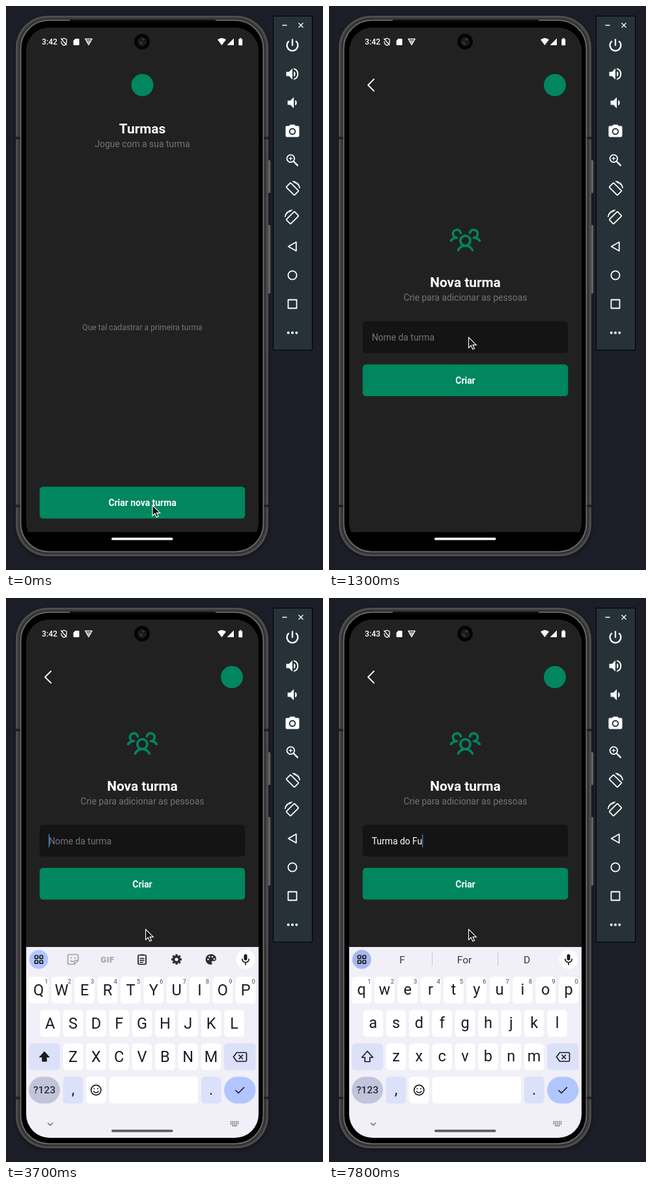
Recreate the animation shown at these times as an HTML page. Size 487x863 px, loop 8000 ms.

```html
<!DOCTYPE html>
<html lang="pt-BR">
<head>
<meta charset="utf-8">
<style>
html, body { margin: 0; width: 100%; height: 100%; overflow: hidden; background: #1b1e26; }
svg { display: block; width: 487px; height: 863px; font-family: Roboto, sans-serif; }
.mid { text-anchor: middle; }
.title { font-size: 20.8px; font-weight: 700; fill: #fff; }
.sub { font-size: 13.9px; fill: #73737f; }
.small { font-size: 12.15px; fill: #73737f; }
.btn { font-size: 13.9px; font-weight: 700; fill: #fff; }
.key { font-size: 23.5px; fill: #1b1c22; }
.hint { font-size: 9.5px; fill: #45464f; }
.word { font-size: 15.5px; fill: #34353c; }
.line { fill: none; stroke-linecap: round; stroke-linejoin: round; }
</style>
</head>
<body>
<svg viewBox="0 0 487 863">
  <defs>
    <clipPath id="screen"><rect x="31" y="33" width="357" height="793" rx="36"/></clipPath>
    <linearGradient id="side"><stop offset="0" stop-color="#333"/><stop offset=".5" stop-color="#858585"/><stop offset="1" stop-color="#444"/></linearGradient>
    <filter id="shadow"><feDropShadow dx="0" dy="2" stdDeviation="3" flood-opacity=".4"/></filter>
  </defs>

  <g id="phone">
    <rect x="402" y="236" width="4.5" height="50" rx="1.5" fill="url(#side)"/>
    <rect x="402" y="335" width="4.5" height="105" rx="1.5" fill="url(#side)"/>
    <rect x="15" y="15" width="388" height="827" rx="49" fill="#454545" filter="url(#shadow)"/>
    <rect x="16" y="16" width="386" height="825" rx="48" fill="none" stroke="#595959"/>
    <rect x="20" y="19.5" width="378" height="818" rx="45" fill="none" stroke="#303030" stroke-width="2"/>
    <rect x="22.7" y="22" width="372.6" height="813" rx="43" fill="#000" stroke="#6c6c6c" stroke-width="1.6"/>
    <path d="M98 22.5H322" stroke="#0b0b0b" stroke-width="3"/>
    <path d="M15 202h7M396 202h7M15 765h7M396 765h7" stroke="#222" stroke-width="4"/>
  </g>

  <g clip-path="url(#screen)">
    <rect x="31" y="33" width="357" height="772" fill="#212121"/>
    <g id="home">
      <rect x="31" y="33" width="357" height="772" fill="#212121"/>
      <circle cx="209.5" cy="121" r="17" fill="#00875f"/>
      <text class="mid title" x="209.5" y="195">Turmas</text>
      <text class="mid sub" x="209.5" y="215.5">Jogue com a sua turma</text>
      <text class="mid small" x="209.5" y="496">Que tal cadastrar a primeira turma</text>
      <g id="homeButton">
        <rect x="51.7" y="735.6" width="315.5" height="48.6" rx="5.2" fill="#00875f"/>
        <text class="mid btn" x="209.5" y="765">Criar nova turma</text>
      </g>
    </g>
    <g id="create">
      <rect x="31" y="33" width="357" height="772" fill="#212121"/>
      <circle cx="347" cy="121" r="17" fill="#00875f"/>
      <path class="line" d="M69 112l-9 9 9 9" stroke="#fff" stroke-width="1.8"/>
      <g id="form">
        <g class="line" transform="translate(185.1 332.5) scale(.19)" stroke="#00875f" stroke-width="19">
          <circle cx="128" cy="140" r="40"/>
          <path d="M196 116a59.8 59.8 0 0 1 48 24M12 140a59.8 59.8 0 0 1 48-24M70.4 216a64.1 64.1 0 0 1 115.2 0M60 116a32 32 0 1 1 31.4-38M164.6 78a32 32 0 1 1 31.4 38"/>
        </g>
        <text class="mid title" x="209.5" y="430">Nova turma</text>
        <text class="mid sub" x="209.5" y="451">Crie para adicionar as pessoas</text>
        <rect x="51.7" y="482.5" width="315.5" height="48.6" rx="5.2" fill="#141414"/>
        <text id="field" class="sub" x="65.7" y="512"></text>
        <rect id="caret" y="497" width="1.6" height="20" fill="#2f78ae"/>
        <rect x="51.7" y="548.5" width="315.5" height="48.6" rx="5.2" fill="#00875f"/>
        <text class="mid btn" x="209.5" y="578">Criar</text>
      </g>
    </g>
    <path d="M31 805h357v21H31z" fill="#000"/>
    <rect x="162" y="813.6" width="94.5" height="3.6" rx="1.8" fill="#f4f4f4"/>
    <g id="keyboard"></g>
  </g>

  <g fill="#fff">
    <text id="clock" x="55" y="59" font-size="12.2" font-weight="500"></text>
    <path class="line" d="M85.5 51l3.5-1.6 4 1.6v3.5c0 3-2 5-4 5.8-2-.8-4-2.8-4-5.8M84.5 50l8.5 9.5" stroke="#fff" stroke-width="1.3"/>
    <path d="M106.5 50h5q1 0 1 1v8q0 1-1 1h-7q-1 0-1-1v-6z"/>
    <path class="line" d="M121.8 50.5h10.4L127 59.5zM124.5 53.5h5M126 56h2" stroke="#fff" stroke-width="1.3"/>
    <path d="M325 51.5q6.500-5 13 0L331.5 60zM350 49.5V60H339.5zM358 50.5h1V49h2.5v1.500h1q.7 0 .7.7v8.300q0 .7-.7.7H358q-.7 0-.7-.7v-8.300q0-.7.7-.7z"/>
  </g>
  <circle cx="209" cy="54.5" r="12" fill="#050505"/>
  <circle cx="209" cy="54.5" r="6" fill="#1d1717" stroke="#302a2a"/>
  <path class="line" d="M206 55a3 3 0 0 0 3 2.500M210 52l2-1" stroke="#7b6a66"/>

  <rect x="410.5" y="15.5" width="60" height="511" fill="#263238" stroke="#000"/>
  <path d="M424.5 29.5h7M449.5 26l7 7m0-7l-7 7" stroke="#fff" stroke-width="1.3"/>
  <g id="tools" fill="#fff"></g>

  <path id="pointer" d="M0 0v16l3.800-3.500 2.500 5.700 2.700-1.200-2.500-5.400h5.300z" fill="#161616" stroke="#fff" stroke-width="1.1"/>
</svg>

<script>
const $ = id => document.getElementById(id);
const show = (id, on) => $(id).style.display = on ? '' : 'none';
const clamp = x => Math.min(1, Math.max(0, x));
const ramp = (t, from, to) => clamp((t - from) / (to - from));

// Emulator toolbar: one 24-unit icon every 44px
const outline = 'class="line" stroke="#fff" stroke-width="1.7"';
const rotateIcon = `<g ${outline} stroke-linejoin="miter">
  <rect x="3.5" y="7.5" width="17" height="9" rx="1" transform="rotate(45 12 12)"/>
  <path d="M12.5 1Q21.500 1.500 23 10.500M16 3.200Q21.500 5.500 22.500 10.500" stroke-width="1"/></g>
  <path d="M11.500 0l4 4 1.500-1.500-2-2z"/>`;
const speaker = x => `<path d="M${x} 9v6h4l5 5V4l-5 5z"/><path d="M${x + 11} 8v8q2.500-1.200 2.500-4t-2.500-4z"/>`;
const tools = [
  `<path ${outline} style="stroke-width:2.2;stroke-linecap:butt" d="M12 3v10M7 5.900a8 8 0 1 0 10 0"/>`,
  speaker(3) + `<path ${outline} style="stroke-linecap:butt;stroke-width:2" d="M14 4.300a8 8 0 0 1 0 15.400"/>`,
  speaker(5),
  '<path fill-rule="evenodd" d="M9 2L7.200 4H4q-2 0-2 2v12q0 2 2 2h16q2 0 2-2V6q0-2-2-2h-3.200L15 2zM12 7a5 5 0 1 1 0 10 5 5 0 1 1 0-10z"/><circle cx="12" cy="12" r="3.200"/>',
  `<g ${outline}><circle cx="9.5" cy="9.5" r="5.5"/><path d="M14.500 14.500l5 5" stroke-width="2.3"/><path d="M7.200 9.500h4.600M9.500 7.200v4.600" stroke-width="1.2"/></g>`,
  rotateIcon,
  `<g transform="matrix(-1 0 0 1 24 0)">${rotateIcon}</g>`,
  `<path ${outline} d="M17.500 5.500v13L6 12z"/>`,
  `<circle ${outline} cx="12" cy="12" r="6.3"/>`,
  `<rect ${outline} x="5.8" y="5.8" width="12.4" height="12.4"/>`,
  '<circle cx="6" cy="12" r="1.9"/><circle cx="12" cy="12" r="1.9"/><circle cx="18" cy="12" r="1.9"/>'
];
$('tools').innerHTML = tools.map((icon, i) =>
  `<g transform="translate(427.4 ${47.4 + 44 * i}) scale(1.05)">${icon}</g>`).join('');

// Keyboard
const PITCH = 35.35;
const rows = [['QWERTYUIOP', 50, 579.5], ['ASDFGHJKL', 67.7, 630.5], ['ZXCVBNM', 103, 681.5]];
const key = (x, y, w, fill = '#fff', r = 5.5) =>
  `<rect x="${x}" y="${y}" width="${w}" height="41" rx="${r}" fill="${fill}"/>`;
const label = (cls, x, y, text) => `<text class="mid ${cls}" x="${x}" y="${y}">${text}</text>`;
const eachKey = draw => rows.map(([letters, x, y]) =>
  [...letters].map((c, i) => draw(c, x + i * PITCH, y)).join('')).join('');
const dark = 'class="line" stroke="#1b1c22" stroke-width="1.7"';
const pale = '#dce1fa';
const arrow = 'M59 693.500l8.500 9.500h-4.700v6.500h-7.600V703h-4.700z';
const gear = Array.from({length: 8}, (_, i) =>
  `<rect x="260.3" y="545" width="3.4" height="5" rx=".8" transform="rotate(${i * 45} 262 553)"/>`).join('');

$('keyboard').innerHTML = `
  <rect x="31" y="534" width="357" height="292" fill="#f1eff7"/>
  <circle id="menu" cx="50.3" cy="553" r="14.5"/>
  <g ${dark}>${[44.3, 51.8].map(x => [547, 554.5].map(y =>
    `<rect x="${x}" y="${y}" width="4.7" height="4.7" rx="1"/>`).join('')).join('')}</g>
  <circle cx="368" cy="553" r="14.5" fill="#fff"/>
  <rect x="365.5" y="545" width="5" height="9.5" rx="2.5" fill="#1b1c22"/>
  <path ${dark} d="M362.800 552.500a5.200 5.200 0 0 0 10.400 0M368 558v3"/>
  <g id="shortcuts">
    <path class="line" stroke="#a3a3a9" stroke-width="1.7" d="M97 545.500h12q2 0 2 2v7l-6 6h-8q-2 0-2-2v-11q0-2 2-2zM111 554.500h-4q-2 0-2 2v4M100 550v1M106 550v1M99 555q2 2 4 1"/>
    <text class="mid" x="156" y="557.5" font-size="12.5" font-weight="900" letter-spacing=".6" fill="#a3a3a9">GIF</text>
    <path ${dark} d="M204.500 546.500h9q1.500 0 1.500 1.500v11q0 1.500-1.500 1.500h-9q-1.500 0-1.500-1.500v-11q0-1.500 1.500-1.500zM206 551.500h6M206 554.500h6M206 557.500h4M207 546h4"/>
    <g fill="#2c2d33">${gear}</g><circle cx="262" cy="553" r="4.3" fill="none" stroke="#2c2d33" stroke-width="3.4"/>
    <path d="M315 545c-11 0-11 16 0 16 2 0 2-2 1-3s0-2.500 2-2.500h2c5 0 4-10.500-5-10.500z" fill="#2c2d33"/>
    <g fill="#f1eff7"><circle cx="310.5" cy="553" r="1.3"/><circle cx="312.5" cy="549" r="1.3"/><circle cx="317" cy="549" r="1.3"/><circle cx="320" cy="552.5" r="1.3"/></g>
  </g>
  <g id="words">
    ${[112.5, 208, 304].map((x, i) => `<text id="word${i}" class="mid word" x="${x}" y="558.5"></text>`).join('')}
    <path d="M158.500 543v20M259.500 543v20" stroke="#c9c8d0"/>
  </g>
  ${eachKey((c, x, y) => key(x - 15.4, y, 30.8))}
  ${key(35, 681.5, 48, pale)}${key(335, 681.5, 48.5, pale)}
  ${key(35, 732.5, 48, '#c0c5dc', 20.5)}${key(87.5, 732.5, 30.8, pale)}${key(123, 732.5, 30.8)}
  ${key(158.5, 732.5, 136.5)}${key(299.8, 732.5, 30.8, pale)}${key(335, 732.5, 48.5, '#b1c5ff', 20.5)}
  <g id="upper">${eachKey((c, x, y) => label('key', x, y + 28.7, c))}<path d="${arrow}" fill="#1b1c22"/></g>
  <g id="lower">${eachKey((c, x, y) => label('key', x, y + 27, c.toLowerCase()))}<path ${dark} d="${arrow}"/></g>
  ${[...'1234567890'].map((d, i) => label('hint', 62 + i * PITCH, 590, d)).join('')}
  <text class="mid" x="59" y="758" font-size="15.5" font-weight="500" fill="#2c2d36">?123</text>
  ${label('key', 103, 760, ',')}${label('key', 315, 760, '.')}
  <g ${dark}>
    <circle cx="138.3" cy="753" r="7.6"/><path d="M135.500 750.500v.5M141 750.500v.5M134.500 755q3.800 4 7.600 0"/>
    <path d="M353 753.500l4 4 8.500-8.500"/>
    <path d="M354.500 695.500H368q1.500 0 1.500 1.500v10.500q0 1.500-1.500 1.500h-13.500l-5-6.700zM358 699.500l5.500 5.500m0-5.500l-5.500 5.500"/>
  </g>
  <path class="line" d="M64.500 803.500l3.500 3.500 3.500-3.500" stroke="#6f6f76" stroke-width="1.5"/>
  <path d="M344.500 801.500h13M344.500 804.500h13" stroke="#77777e" stroke-width="1.8" stroke-dasharray="1.8 1"/><path d="M347 807.500h8" stroke="#77777e" stroke-width="1.6"/>
  <rect id="pill" x="162" y="813.6" width="94.5" height="3.6" rx="1.8"/>`;

// Timelines
const typed = [[0, ''], [5200, 'T'], [5400, 'Tu'], [5600, 'Tur'], [5800, 'Turm'], [6000, 'Turma'],
  [6200, 'Turma '], [6300, 'Turma d'], [6400, 'Turma do'], [6500, 'Turma do '], [7500, 'Turma do F'], [7800, 'Turma do Fu']];
const suggestions = [[0, ''], [5300, 'T|The|To'], [5500, 'Tu|Tuesday|Turn'], [5800, 'Tur|Turn|Turned'],
  [5900, 'Turm|Turma|Turn'], [6100, 'Turma|Turmas|Turban'], [6300, 'and|is|the'], [6400, 'd|do|don'],
  [6600, 'do|don’t|dog'], [6800, 'not|you|it'], [7600, 'F|For|D']];
const pointerPath = [[0, 225, 764], [400, 224, 762], [500, 222, 753], [600, 222, 725], [700, 223, 668], [800, 226, 595],
  [900, 227, 533], [1000, 223, 522], [1100, 218, 513], [1300, 214.5, 507], [8000, 214.5, 507]];
const latest = (list, t) => list.filter(step => step[0] <= t).pop();

const bezier = (s, a, b, c, d) => a * (1 - s) ** 3 + 3 * b * s * (1 - s) ** 2 + 3 * c * s * s * (1 - s) + d * s ** 3;

// Very quick start with a long settling tail
function extraSlowIn(x) {
  const early = x < 1 / 6;
  const xs = early ? [0, .05, .1333, 1 / 6] : [1 / 6, .2083, .25, 1];
  const ys = early ? [0, 0, .06, .4] : [.4, .82, 1, 1];
  let lo = 0, hi = 1;
  for (let i = 0; i < 24; i++) {
    const mid = (lo + hi) / 2;
    if (bezier(mid, ...xs) < x) lo = mid; else hi = mid;
  }
  return bezier(lo, ...ys);
}

function drawPointer(t) {
  const next = Math.max(1, pointerPath.findIndex(p => p[0] > t));
  const [t0, x0, y0] = pointerPath[next - 1], [t1, x1, y1] = pointerPath[next];
  const k = ramp(t, t0, t1);
  $('pointer').setAttribute('transform', `translate(${x0 + (x1 - x0) * k} ${y0 + (y1 - y0) * k})`);
}

function drawScreens(t) {
  const slide = extraSlowIn(ramp(t, 305, 755)) * 35.7;
  show('home', t < 755);
  $('home').setAttribute('transform', `translate(${-slide} 0)`);
  $('homeButton').setAttribute('opacity', 1 - .8 * (ramp(t, 80, 230) - ramp(t, 270, 520)));
  $('create').setAttribute('transform', `translate(${35.7 - slide} 0)`);
  $('create').setAttribute('opacity', ramp(t, 355, 438));
  $('form').setAttribute('transform', `translate(0 ${t < 1800 ? 0 : -135.5})`);
}

function drawField(t) {
  const [since, text] = latest(typed, t);
  const field = $('field');
  field.textContent = text.replaceAll(' ', '\u00a0') || 'Nome da turma';
  field.style.fill = text ? '#fff' : '';
  const blinkStart = text ? since : 1700;
  show('caret', t >= 1700 && Math.floor((t - blinkStart) / 500) % 2 === 0);
  $('caret').setAttribute('x', 65.3 + (text ? field.getComputedTextLength() : 0));
}

function drawKeyboard(t) {
  const rise = 1 - (1 - ramp(t, 1710, 1890)) ** 2;
  $('keyboard').setAttribute('transform', `translate(0 ${292 * (1 - rise)})`);
  show('keyboard', rise > 0);
  show('upper', t < 5200);
  show('lower', t >= 5200);
  const words = latest(suggestions, t)[1];
  show('shortcuts', !words);
  show('words', words);
  words.split('|').forEach((word, i) => $('word' + i).textContent = word);
  $('menu').setAttribute('fill', words ? '#a6b7ee' : '#b1c5ff');
  $('pill').setAttribute('fill', t < 2000 ? '#d0cfd5' : '#5d5d61');
}

function frame(now) {
  const t = now % 8000;
  drawScreens(t);
  drawField(t);
  drawKeyboard(t);
  drawPointer(t);
  $('clock').textContent = t < 7800 ? '3:42' : '3:43';
  requestAnimationFrame(() => frame(performance.now() - start));
}
const start = performance.now();
frame(0);
</script>
</body>
</html>
```
